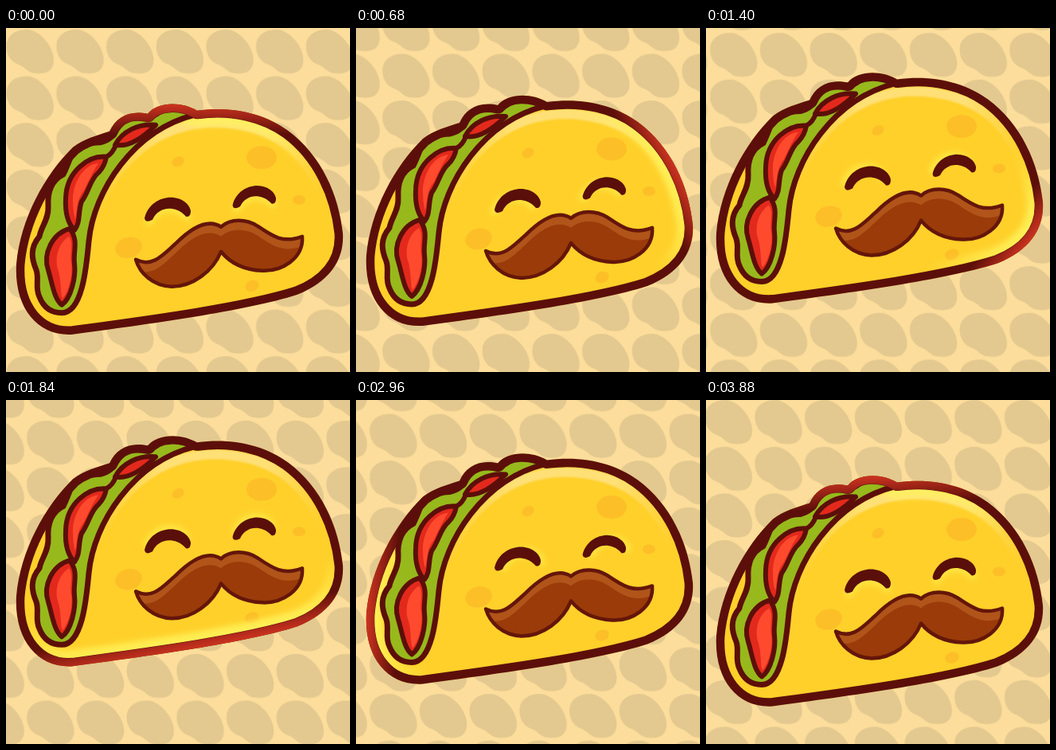
Animation, 432 px wide and 432 px high, one loop 3920 ms. Source, as an HTML page:

```html
<!DOCTYPE html>
<html>
<head>
<meta charset="utf-8">
<title>Bobbing taco</title>
<style>
html, body { margin: 0; width: 100%; height: 100%; overflow: hidden; background: #fcdd9b; }
svg { display: block; width: 100vw; height: 100vh; }
.line { stroke: #5c0f0a; }
</style>
</head>
<body>
<svg viewBox="0 0 432 432" xmlns="http://www.w3.org/2000/svg">
  <defs>
    <path id="outer" d="M13 297C18 240 49 184 84 150C98 139 115 135 130 130C138 112 155 103 178 108
      C190 93 220 92 240 104C285 98 325 108 354 129C396 160 418 210 423 258C425 290 408 318 366 335
      C300 356 180 372 84 385C40 388 10 352 13 297Z"/>
    <path id="hair" d="M163 291C184 302 198 284 213 271C230 254 252 238 270 250C282 239 302 240 316 249
      C335 262 348 271 372 262C374 290 346 306 322 305C298 304 282 296 270 281
      C260 306 234 325 208 325C184 324 168 308 163 291Z"/>
    <path id="eye" d="M174 239C178 222 193 213 207 213C221 213 231 222 232 230Q232 238 226 237
      C219 229 211 227 205 227C196 227 188 232 184 241Q175 246 174 239Z"/>
    <g id="eyes">
      <use href="#eye"/>
      <use href="#eye" transform="translate(121 -2) scale(.94)"/>
    </g>
    <pattern id="tiles" width="62.7" height="58.6" patternUnits="userSpaceOnUse">
      <path fill="#e3c98f" d="M1 18C4 6 16 1 28 2C44 4 60 24 60 40C60 54 50 58 40 57
        C26 57 26 50 16 46C4 42 -1 30 1 18Z"/>
    </pattern>
    <linearGradient id="edge">
      <stop offset="0" stop-color="#ffe48a" stop-opacity="0"/>
      <stop offset=".3" stop-color="#ffe48a"/>
      <stop offset=".75" stop-color="#ffe48a"/>
      <stop offset="1" stop-color="#ffe48a" stop-opacity="0"/>
    </linearGradient>
    <linearGradient id="rim" gradientUnits="userSpaceOnUse">
      <stop offset="0" stop-color="#cc3320" stop-opacity="0"/>
      <stop offset="1" stop-color="#cc3320"/>
    </linearGradient>
    <linearGradient id="shine" gradientUnits="userSpaceOnUse">
      <stop offset="0" stop-color="#fff45c" stop-opacity="0"/>
      <stop offset="1" stop-color="#fff45c"/>
    </linearGradient>
    <clipPath id="inOuter"><use href="#outer"/></clipPath>
    <clipPath id="inHair"><use href="#hair"/></clipPath>
    <filter id="soft" x="-20%" y="-20%" width="140%" height="140%"><feGaussianBlur stdDeviation="3"/></filter>
    <filter id="slight" x="-20%" y="-20%" width="140%" height="140%"><feGaussianBlur stdDeviation="1.2"/></filter>
  </defs>

  <rect width="432" height="432" fill="#fcdd9b"/>
  <rect width="432" height="432" fill="url(#tiles)"/>

  <g id="taco" stroke-linejoin="round" stroke-linecap="round">
    <g clip-path="url(#inOuter)">
      <use href="#outer" fill="#ffd02a"/>
      <g fill="#fdbf28">
        <ellipse cx="321" cy="163" rx="19" ry="14.5"/>
        <ellipse cx="216" cy="168" rx="8" ry="6" transform="rotate(-30 216 168)"/>
        <ellipse cx="368" cy="216" rx="8" ry="6"/>
        <ellipse cx="154" cy="276" rx="17" ry="13" transform="rotate(-15 154 276)"/>
        <ellipse cx="309" cy="324" rx="9" ry="7" transform="rotate(-20 309 324)"/>
      </g>
      <path d="M116 228C140 165 190 120 262 119C330 120 372 150 396 205" fill="none"
        stroke="url(#edge)" stroke-width="12" opacity=".8" filter="url(#slight)"/>
      <use href="#outer" fill="none" stroke="url(#shine)" stroke-width="42" filter="url(#soft)"/>

      <path class="line" fill="#97b91c" stroke-width="7" d="M70 358C96 358 101 300 104 268C110 205 160 128 238 109
        C225 99 205 99 192 106Q184 113 172 111C158 109 146 114 138 128Q134 140 118 144
        C104 144 92 148 82 160Q76 176 72 184C56 192 52 208 53 224C54 240 44 250 42 262
        C30 276 32 290 38 304C42 316 36 326 42 338Q50 358 70 358Z"/>
      <g class="line" fill="#e3291c" stroke-width="6">
        <path d="M80 252C58 258 46 284 53 304C58 320 60 340 70 348C82 340 88 312 86 296C84 280 92 268 80 252Z"/>
        <path d="M126 162C104 160 76 180 75 214C74 232 78 246 86 254C94 244 90 232 95 218
          C104 206 106 190 116 182Q124 174 126 162Z"/>
        <path d="M188 122C166 120 146 130 137 147C152 150 168 142 188 122Z"/>
        <path d="M126 162Q134 158 138 147" fill="none"/>
      </g>
      <g fill="#ff4a2e">
        <path d="M79 262C66 270 60 290 66 306C70 322 68 334 71 340C80 330 84 308 82 296C80 280 85 272 79 262Z"/>
        <path d="M116 170C96 172 84 196 84 216Q84 232 87 240C90 228 88 216 98 204C104 192 108 182 116 170Z"/>
      </g>
      <use href="#outer" fill="none" class="line" stroke-width="21"/>
      <use href="#outer" fill="none" stroke="url(#rim)" stroke-width="20"/>
    </g>

    <g id="glow" fill="#ffec4a" opacity=".7" filter="url(#soft)"><use href="#eyes"/></g>
    <use href="#eyes" fill="#5a0f0a"/>

    <g clip-path="url(#inHair)">
      <use href="#hair" fill="#b0541a"/>
      <use href="#hair" fill="#9a3b09" y="12"/>
    </g>
    <use href="#hair" fill="none" stroke="#64160a" stroke-width="4.5"/>
  </g>
</svg>
<script>
const LOOP = 3920, STEP = 40, TILE_W = 62.7, TILE_H = 58.6;
const CX = 218, CY = 245, SAMPLES = 80;
const $ = id => document.getElementById(id);

const outer = $('outer'), len = outer.getTotalLength();
const rimPoints = Array.from({ length: SAMPLES }, (_, i) => outer.getPointAtLength(len * i / SAMPLES));

// Light band of the given depth, ending at the outermost point in direction (dx, dy)
function aim(id, dx, dy, depth) {
  const reach = Math.max(...rimPoints.map(p => (p.x - CX) * dx + (p.y - CY) * dy));
  const set = (k, v) => $(id).setAttribute(k, v.toFixed(2));
  set('x1', CX + dx * (reach - depth));
  set('y1', CY + dy * (reach - depth));
  set('x2', CX + dx * reach);
  set('y2', CY + dy * reach);
}

function shift(id, x, y, attr = 'transform') {
  $(id).setAttribute(attr, `translate(${x.toFixed(2)} ${y.toFixed(2)})`);
}

function draw(t) {
  const u = t / LOOP, turn = u * 2 * Math.PI;
  const dx = Math.sin(turn), dy = -Math.cos(turn);
  shift('taco', 0, -26 * (1 - Math.cos(turn - 0.13)));
  shift('tiles', u * 3 * TILE_W, u * 3 * TILE_H, 'patternTransform');
  shift('glow', -dx * 6, -dy * 6);
  aim('rim', dx, dy, 38);
  aim('shine', dx, dy, 80);
}

let start = null;
function tick(now) {
  if (start === null) start = now;
  draw(Math.floor(((now - start) % LOOP) / STEP) * STEP);
  requestAnimationFrame(tick);
}
draw(0);
requestAnimationFrame(tick);
</script>
</body>
</html>
```
